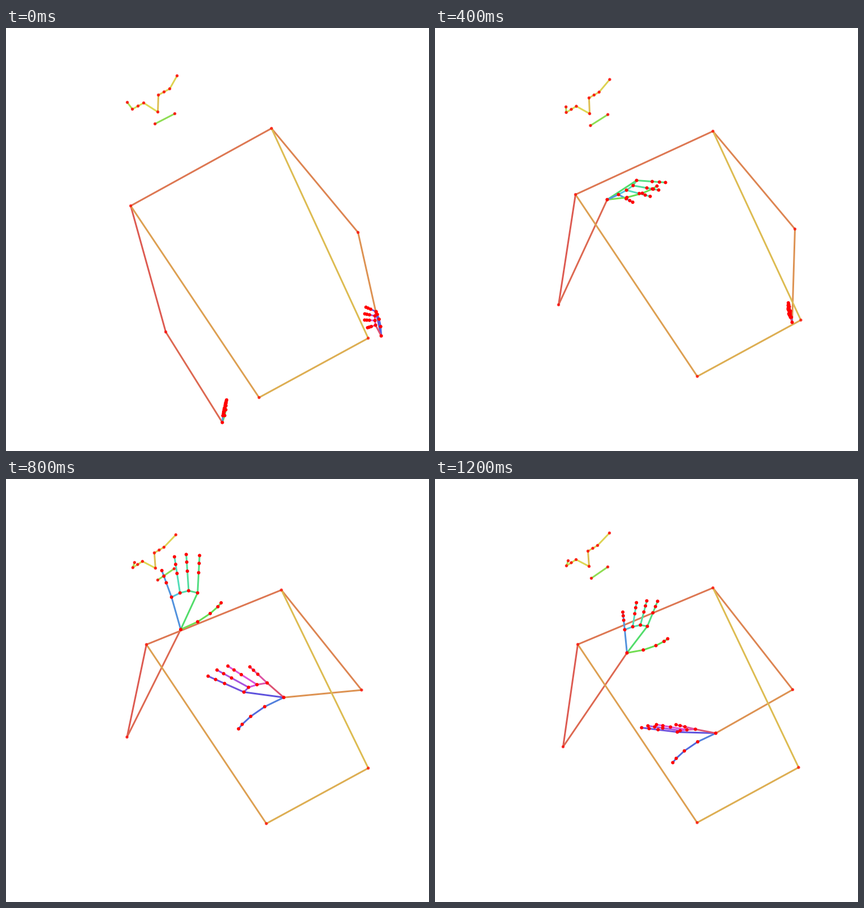
Write a matplotlib script that moves like this. It is 748x748 px and loops after 1.28 s.

```python
import colorsys

import numpy as np
import matplotlib.pyplot as plt
from matplotlib.animation import FuncAnimation
from matplotlib.collections import LineCollection

SIZE, DPI, FRAMES, INTERVAL = 748, 100, 16, 80
PX = 72 / DPI
FACE, LEFT, RIGHT = 8, 19, 40  # first face and hand joints after the body

times, poses = [], []


def points(*values):
    return np.array(values, float).reshape(-1, 2)


def pose(time, nose, shoulders, left_arm, right_arm, left_hand, right_hand):
    """Arms give elbow and wrist. Hands give the index and little knuckles,
    the middle fingertip and the thumb tip."""
    left_arm, right_arm = points(*left_arm), points(*right_arm)
    times.append(time)
    poses.append(np.vstack([points(*nose), points(*shoulders), left_arm, right_arm,
                            points(*left_hand) - left_arm[1],
                            points(*right_hand) - right_arm[1]]))


# Arm hanging, raised past the face, waving, then both hands settling.
pose(0, (268, 148), (220, 314, 469, 177), (282, 537, 382, 697), (622, 361, 663, 544),
     (385, 678, 383, 685, 389, 659, 388, 664), (654, 501, 653, 525, 634, 505, 654, 502))
pose(3, (276, 142), (245, 300, 489, 174), (247, 529, 268, 379), (635, 349, 660, 540),
     (290, 348, 290, 375, 324, 367, 306, 338), (662, 488, 657, 503, 658, 478, 661, 461))
pose(5, (273, 151), (248, 294, 491, 182), (218, 489, 304, 303), (636, 355, 631, 520),
     (356, 269, 324, 294, 395, 286, 392, 279), (628, 500, 628, 511, 624, 490, 624, 497))
pose(7, (264, 159), (248, 290, 492, 194), (201, 459, 322, 269), (638, 368, 558, 452),
     (371, 221, 323, 233, 390, 198, 419, 245), (515, 452, 545, 448, 496, 446, 509, 490))
pose(9, (266, 157), (251, 289, 490, 196), (207, 447, 302, 252), (629, 374, 498, 391),
     (335, 189, 287, 197, 320, 128, 378, 208), (431, 382, 473, 367, 389, 346, 422, 446))
pose(12, (259, 158), (240, 300, 480, 194), (227, 483, 335, 308), (631, 367, 500, 407),
     (365, 248, 324, 256, 350, 183, 405, 265), (432, 401, 465, 388, 381, 371, 423, 456))
pose(15, (272, 154), (252, 292, 491, 192), (226, 473, 339, 307), (632, 372, 496, 449),
     (375, 260, 335, 266, 374, 215, 411, 282), (428, 447, 460, 442, 376, 436, 420, 501))

poses = np.array(poses)
slopes = np.gradient(poses, times, axis=0)
slopes[0] = 0  # the movement starts from rest


def pose_at(time):
    """Cubic Hermite path through the poses."""
    i = min(np.searchsorted(times, time, side="right") - 1, len(times) - 2)
    span = times[i + 1] - times[i]
    u = (time - times[i]) / span
    ease = u * u * (3 - 2 * u)
    return (poses[i] * (1 - ease) + poses[i + 1] * ease
            + span * u * (1 - u) * (slopes[i] * (1 - u) - slopes[i + 1] * u))


# Ear, outer eye, inner eye on both sides, then the mouth, all seen from the nose.
TURNED = points(-54, -17, -45, -5, -25, -16, 1, -30, 21, -41, 34, -64, -5, 21, 30, 3)
SETTLED = points(-37, -10, -40, -1, -23, -12, -2, -27, 15, -37, 36, -59, 4, 21, 33, 1)


def face_points(nose, time):
    turn = max(0, 1 - time / 7)
    l_ear, l_out, l_in, r_in, r_out, r_ear, l_mouth, r_mouth = (
        nose + SETTLED + turn * (TURNED - SETTLED))
    return [l_ear, l_out, (l_out + l_in) / 2, l_in, nose,
            r_in, (r_in + r_out) / 2, r_out, r_ear, l_mouth, r_mouth]


def hand_points(wrist, index, little, middle_tip, thumb):
    """Fan four fingers out from an arched row of knuckles; the thumb bows."""
    normal = np.array([-thumb[1], thumb[0]])
    joints = [np.zeros(2)]
    joints += [along * thumb + 0.06 * bow * normal
               for along, bow in ((0.38, 1), (0.69, 1), (0.9, 0.5), (1, 0))]
    width = index - little
    reach = middle_tip - (2 * index + little) / 3
    fans = zip((0, 0.09, 0.07, 0), (0.92, 0.91, 0.92, 0.7), (0.17, 0, -0.12, -0.3))
    for i, (arch, length, spread) in enumerate(fans):
        knuckle = index - width * i / 3 + arch * reach
        finger = length * reach + spread * width
        joints += [knuckle + part * finger for part in (0, 0.54, 0.79, 1)]
    return np.array(joints) + wrist


def skeleton(time):
    nose, l_shoulder, r_shoulder, l_elbow, l_wrist, r_elbow, r_wrist, *hands = pose_at(time)
    torso = 0.928 + 0.072 * np.exp(-time / 4)  # shrinks as the body leans back
    l_hip = l_shoulder + torso * np.array([227, 339])
    r_hip = l_hip + torso * np.array([193, -105])
    return np.array([l_shoulder, r_shoulder, l_elbow, l_wrist, r_elbow, r_wrist,
                     l_hip, r_hip, *face_points(nose, time),
                     *hand_points(l_wrist, *hands[:4]),
                     *hand_points(r_wrist, *hands[4:])])


def hand_limbs(base, fingers, palm):
    """Five fingers, then the palm from the thumb round to the wrist."""
    limbs = [(base + 4 * f + j, base + 4 * f + j + 1, hue)
             for f, hue in enumerate(fingers) for j in (1, 2, 3)]
    ring = [(0, 1), (0, 5), (5, 9), (9, 13), (13, 17), (0, 17)]
    return limbs + [(base + a, base + b, hue) for (a, b), hue in zip(ring, palm)]


# Every limb is a pair of joints; hues run round the colour wheel.
body_pairs = [(0, 2), (2, 3), (0, 1), (1, 4), (4, 5), (0, 6), (6, 7), (1, 7)]
limbs = [(a, b, 4 + 6 * i) for i, (a, b) in enumerate(body_pairs)]
face_hues = (80, 66, 64, 58, 47, 52, 54, 56)
limbs += [(FACE + i, FACE + i + 1, hue) for i, hue in enumerate(face_hues)]
limbs += [(FACE + 9, FACE + 10, 94)]
limbs += hand_limbs(LEFT, (112, 140, 152, 164, 210), (106, 131, 146, 160, 190, 212))
limbs += hand_limbs(RIGHT, np.linspace(230, 325, 5), np.linspace(220, 346, 6))
links = np.array([limb[:2] for limb in limbs])
line_colors = [colorsys.hsv_to_rgb(hue / 360, 0.63, 0.865) for *_, hue in limbs]
dot_colors = [(1, 0, 0, 0.72)] * FACE + [(1, 0, 0, 0.82)] * 11 + [(1, 0, 0, 1)] * 42
dot_widths = np.array([5.4] * LEFT + [6] * 42)

fig = plt.figure(figsize=(SIZE / DPI, SIZE / DPI), dpi=DPI, facecolor="white")
ax = fig.add_axes((0, 0, 1, 1))
ax.set(xlim=(-0.5, SIZE - 0.5), ylim=(SIZE - 0.5, -0.5))
ax.axis("off")

start = skeleton(0)
bones = LineCollection(start[links], colors=line_colors, linewidths=3 * PX,
                       capstyle="round", zorder=1)
ax.add_collection(bones)
dots = ax.scatter(*start.T, s=(dot_widths * PX) ** 2, c=dot_colors,
                  linewidths=0, zorder=2)


def draw(frame):
    joints = skeleton(frame)
    bones.set_segments(joints[links])
    dots.set_offsets(joints)
    return bones, dots


anim = FuncAnimation(fig, draw, frames=FRAMES, interval=INTERVAL,
                     repeat=True, repeat_delay=0)
plt.show()
```
